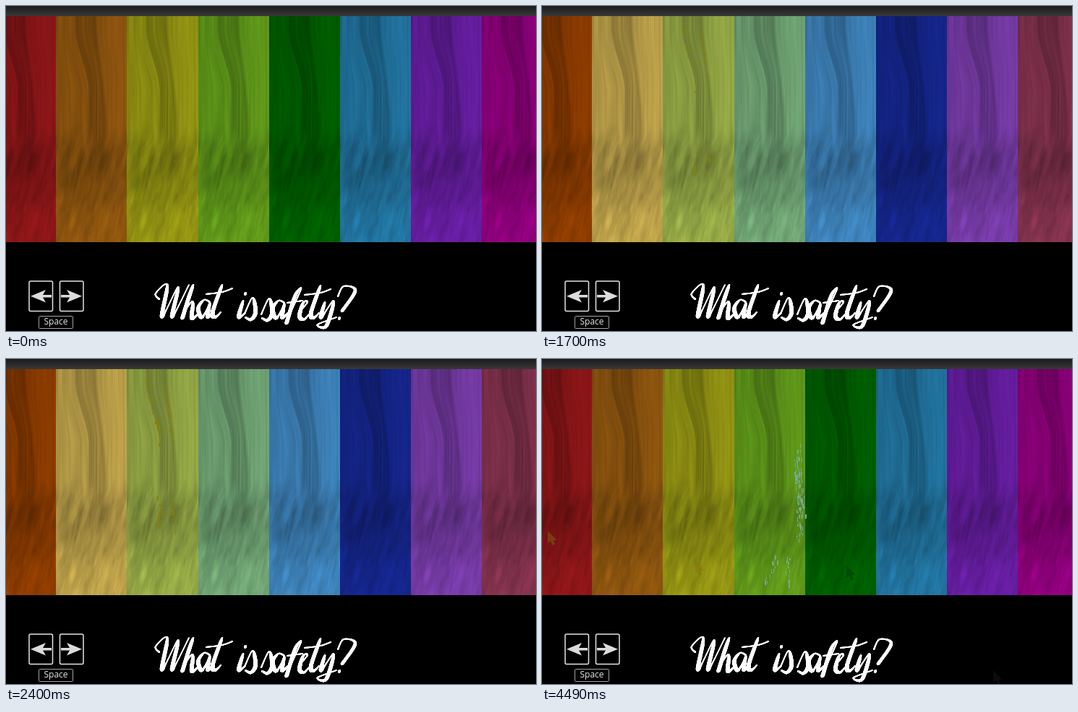
Recreate the animation shown at these times as an HTML page with a canvas. Size 733 by 450 pixels, loop 4.56 s.

```html
<!DOCTYPE html>
<html lang="en">
<head>
<meta charset="utf-8">
<title>What is safety?</title>
<style>
  html, body { margin: 0; width: 100%; height: 100%; overflow: hidden; background: #000; }
  canvas, svg { position: absolute; left: 0; top: 0; width: 733px; height: 450px; }
  .space { font: 400 12px "Open Sans", "Noto Sans", sans-serif; font-stretch: 75%; fill: #e8e8e8; text-anchor: middle; }
</style>
</head>
<body>
<canvas id="stage" width="733" height="450" role="img" aria-label="What is safety?"></canvas>
<svg viewBox="0 0 733 450">
  <g fill="none" stroke="#e4e4e4">
    <rect id="key" x="32" y="381" width="32.5" height="41.5" rx="2" stroke-width="1.5"/>
    <use href="#key" x="42.5"/>
    <rect x="45.5" y="429.5" width="47" height="17" rx="1" stroke="#a4a4a4"/>
  </g>
  <g fill="#dcdcdc">
    <path id="arrow" d="M34 401.7L55 393L51 400H63V403.4H51L55 410.5Z"/>
    <use href="#arrow" transform="translate(139 0) scale(-1 1)"/>
  </g>
  <text class="space" x="69" y="441">Space</text>
</svg>
<script>
const W = 733, H = 450, TOP = 14, BOTTOM = 327, STRIPE = 98.2, LOOP = 4560;
const WARM = ['#8f1618', '#91570f', '#969713', '#629c1a', '#006000', '#2276a3', '#681ea4', '#92007f'];
const COOL = ['#903d00', '#c1a54c', '#98ac47', '#73a877', '#3f85be', '#15268e', '#793caa', '#86334f'];
const MINT = '#74aa91', GOLD = '#85800f';

const smooth = (a, b, v) => {
  const t = Math.max(0, Math.min(1, (v - a) / (b - a)));
  return t * t * (3 - 2 * t);
};
const bump = (v, width) => Math.exp(-((v / width) ** 2));
const stripeX = i => Math.round(-29 + STRIPE * i);

function layer(w = W, h = H) {
  const c = document.createElement('canvas');
  c.width = w;
  c.height = h;
  return c;
}

function hash(x, y) {
  let n = Math.imul(x, 374761393) + Math.imul(y, 668265263);
  n = Math.imul(n ^ (n >>> 13), 1274126177);
  n = Math.imul(n ^ (n >>> 15), 2246822519);
  return ((n ^ (n >>> 16)) >>> 0) / 4294967296;
}

function noise(x, y) {
  const ix = Math.floor(x), iy = Math.floor(y);
  const fx = smooth(0, 1, x - ix), fy = smooth(0, 1, y - iy);
  const a = hash(ix, iy), b = hash(ix + 1, iy), c = hash(ix, iy + 1), d = hash(ix + 1, iy + 1);
  return a + (b - a) * fx + (c - a) * fy + (a - b - c + d) * fx * fy;
}

// The two dark veins of a plank.
const bend = y => smooth(15, 105, y);
const leftVein = y => 28 + 18 * bend(y);
const rightVein = y => 53 + 14 * smooth(0, 150, y);

// Brightness of the wood: bent vertical grain above, rough fibres below.
function wood(x, y) {
  const left = leftVein(y), right = rightVein(y);
  const u = x - 17 * bend(y) * bump(x - 44, 28);
  const band = smooth(left - 3, left + 3, x) * (1 - smooth(right - 3, right + 5, x));
  const lines = band * smooth(70, 110, y) * Math.sin(x * 1.55) * 0.045;
  const upper = 0.87 + 0.09 * x / 98 - 0.13 * band - 0.1 * bump(x - left, 2)
    - 0.06 * bump(x - right, 2.5) + lines
    + 0.12 * (noise(u * 0.3, y * 0.012) - 0.5) + 0.1 * (noise(u * 0.9 + 40, y * 0.009) - 0.5);

  const s = x + 0.22 * y;
  const fibre = 0.5 * noise(s * 0.13, y * 0.035) + 0.3 * noise(s * 0.32, y * 0.06 + 9)
    + 0.2 * noise(s * 0.8, y * 0.12 + 30);
  const lower = 0.81 + 0.06 * x / 98 + 0.14 * smooth(205, 290, y) + 0.36 * (fibre - 0.5)
    - 0.12 * bump(x - 54, 24) * bump(y - 200, 32);
  const mix = smooth(155, 195, y + 16 * noise(x * 0.2, 5));
  return upper + (lower - upper) * mix;
}

const PW = 99, PH = BOTTOM - TOP;
const grain = Float32Array.from({ length: PW * PH }, (_, i) => wood(i % PW, Math.floor(i / PW)));

function plank(color) {
  const c = layer(PW, PH), g = c.getContext('2d'), img = g.createImageData(PW, PH);
  const rgb = [1, 3, 5].map(k => parseInt(color.slice(k, k + 2), 16));
  grain.forEach((v, i) => {
    rgb.forEach((part, k) => { img.data[i * 4 + k] = part * v; });
    img.data[i * 4 + 3] = 255;
  });
  g.putImageData(img, 0, 0);
  return c;
}

// Upright flecks between two heights, placed across by a rule of height and chance.
function scatter(g, color, count, y0, y1, xAt) {
  g.fillStyle = color;
  for (let i = 0; i < count; i++) {
    const rnd = k => hash(i + 1, k + y0);
    const y = y0 + (y1 - y0) * (rnd(1) + rnd(2)) / 2;
    g.fillRect(Math.round(xAt(y, rnd(3), rnd(4))), Math.round(y), 1 + (rnd(5) > 0.75), 2 + 5 * rnd(6));
  }
}

function mintFlecks(g) {
  scatter(g, MINT, 95, 110, 258, (y, a, b) => 347 + 7 * (a + b) + 3 * smooth(150, 210, y));
  scatter(g, MINT, 32, 262, 318, (y, a, b) => (a > 0.5 ? 336 : 338 - 0.4 * (y - 260)) + 7 * b - (a > 0.5 ? 0 : 12));
}

function mintLines(g) {
  mintFlecks(g);
  scatter(g, MINT, 50, 10, 102, (y, a) => (a < 0.4 && y < 55 ? 353 : 359));
}

const goldFlecks = count => g => {
  const x = stripeX(2);
  scatter(g, GOLD, count, TOP, 130, (y, a, b) => x + (a < 0.5 ? leftVein : rightVein)(y - TOP) + 5 * b - 2);
  scatter(g, GOLD, count / 2, 188, 240, (y, a, b) => x + (a < 0.5 ? 42 : 61) + 6 * b);
};

// Brush stroke through the points: heavy going down, fine going up.
function brush(g, pts) {
  const at = i => pts[Math.max(0, Math.min(pts.length - 1, i))];
  const spline = (a, b, c, d, t) =>
    0.5 * (2 * b + (c - a) * t + (2 * a - 5 * b + 4 * c - d) * t * t + (3 * b - a - 3 * c + d) * t ** 3);
  let [px, py] = pts[0], r = 1.2;
  for (let i = 0; i < pts.length - 1; i++) {
    for (let t = 0; t <= 1; t += 0.01) {
      const [x, y] = [0, 1].map(k => spline(at(i - 1)[k], at(i)[k], at(i + 1)[k], at(i + 2)[k], t));
      const len = Math.hypot(x - px, y - py);
      if (len) r += (1 + 1.9 * Math.max(0, (y - py) / len) - r) * Math.min(1, len * 0.22);
      g.beginPath();
      g.ellipse(x, y, r, r * 0.8, -0.5, 0, 7);
      g.fill();
      px = x;
      py = y;
    }
  }
}

// Each letter: advance, then strokes relative to the baseline.
const LETTERS = {
  W: [37, [[5, -26], [0, -34], [16, -46], [9, -2], [31, -43], [23, -2], [46, -46]]],
  h: [22, [[15, -46], [9, -29], [0, 0]], [[1, -6], [14, -23], [13, 0], [22, -6]]],
  a: [19, [[16, -22], [8, -25], [0, -14], [5, -1], [16, -20]], [[16, -21], [13, -2], [21, -8]]],
  t: [14, [[14, -46], [1, -9], [4, -1], [12, -8]], [[-8, -33], [14, -36], [28, -41]]],
  i: [8, [[6, -24], [0, -2], [8, -6]], [[9, -35], [9, -33]]],
  s: [16, [[0, -6], [11, -28], [15, -8], [9, 2], [1, -1]]],
  f: [17, [[4, -5], [20, -41], [12, -32], [0, 6]], [[1, -22], [22, -25]]],
  e: [16, [[0, -8], [12, -23], [6, -22], [1, -4], [7, 1], [16, -8]]],
  y: [23, [[6, -23], [1, -2], [18, -25], [8, 10], [-4, 8], [22, -2]]],
  '?': [0, [[1, -31], [9, -45], [25, -39], [7, -11]], [[3, -2], [3, 0]]]
};

function write(g, word, x, y) {
  for (const letter of word) {
    const [advance, ...strokes] = LETTERS[letter];
    strokes.forEach(stroke => brush(g, stroke.map(([dx, dy]) => [x + dx, y + dy])));
    x += advance;
  }
}

function drawBase(g) {
  g.fillStyle = '#000';
  g.fillRect(0, 0, W, H);
  const bar = g.createLinearGradient(0, 0, 0, TOP);
  bar.addColorStop(0, '#1b1b1b');
  bar.addColorStop(1, '#383838');
  g.fillStyle = bar;
  g.fillRect(0, 0, W, TOP);
  g.fillStyle = '#fff';
  write(g, 'What', 207, 432);
  write(g, 'is', 322, 432);
  write(g, 'safety?', 353, 433);
}

function scene(colors, addFlecks) {
  const c = layer(), g = c.getContext('2d');
  drawBase(g);
  colors.forEach((color, i) => g.drawImage(plank(color), stripeX(i), TOP));
  if (addFlecks) addFlecks(g);
  return c;
}

const scenes = [
  [0, scene(WARM)],
  [1000, scene(COOL, goldFlecks(30))],
  [1770, scene(WARM, mintLines)],
  [2400, scene(COOL, goldFlecks(75))],
  [3480, scene(WARM, mintFlecks)]
];

// Faint traces the pointer leaves on its way: x, y, colour.
const TRACE_START = 3980, TRACE_STEP = 90;
const traces = [
  [8, 238, 'rgba(124,76,14,.75)'],
  [212, 280, 'rgba(142,104,10,.32)'],
  [421, 286, 'rgba(0,56,12,.5)'],
  [624, 431, 'rgba(14,14,14,.8)']
];
const pointer = new Path2D('M0 0V17L4 14L7 20L10 18.5L7.5 13H12.5Z');
const ctx = document.getElementById('stage').getContext('2d');
const start = performance.now();

function draw() {
  const t = (performance.now() - start) % LOOP;
  ctx.drawImage(scenes.filter(([from]) => from <= t).pop()[1], 0, 0);
  traces.forEach(([x, y, color], i) => {
    if (t < TRACE_START + TRACE_STEP * i) return;
    ctx.save();
    ctx.translate(x, y);
    ctx.fillStyle = color;
    ctx.fill(pointer);
    ctx.restore();
  });
  requestAnimationFrame(draw);
}
draw();
</script>
</body>
</html>
```
